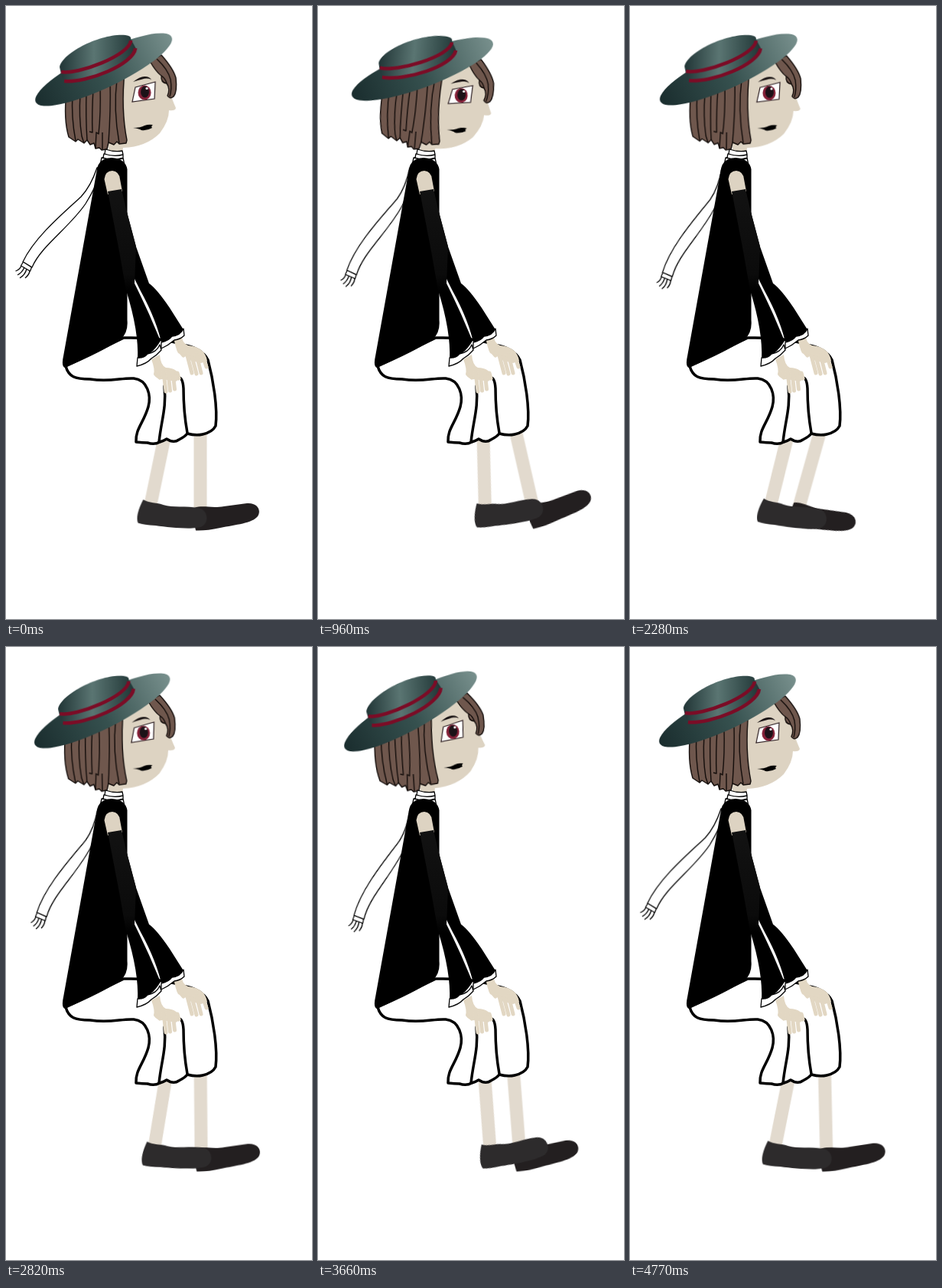
These frames come from a looping animation (400x800 px, 4.8 s). An HTML page:

```html
<!DOCTYPE html>
<html lang="en">
<head>
<meta charset="utf-8">
<title>Swinging legs</title>
<style>
  html, body { margin: 0; width: 100%; height: 100%; overflow: hidden; background: #fff; }
  svg { display: block; width: 400px; height: 800px; }
  .part { transform-box: view-box; animation: 4800ms linear infinite; }
  #head { transform-origin: 140px 188px; animation-name: nod; }
  #tail { transform-origin: 125px 205px; animation-name: flutter; }
  #near { transform-origin: 215px 525px; animation-name: near; }
  #far  { transform-origin: 255px 536px; animation-name: far; }

  @keyframes nod {
    0%, 100% { transform: rotate(.08deg); }
    19.6% { transform: rotate(4.9deg); }
    81.4% { transform: rotate(-4.4deg); }
  }
  @keyframes flutter {
    0%, 100% { transform: rotate(0deg); }
    13.1% { transform: rotate(-9deg); }
    25% { transform: rotate(-5deg); }
    36.2% { transform: rotate(-13deg); }
    54.2% { transform: rotate(-6deg); }
    68.8% { transform: rotate(-11.5deg); }
    76.3% { transform: rotate(-10.4deg); }
    87.5% { transform: rotate(-7deg); }
  }
  @keyframes near {
    0%, 100% { transform: rotate(-.2deg); }
    20.8% { transform: rotate(-13.9deg); }
    50.6% { transform: rotate(3.8deg); }
    77.6% { transform: rotate(-17.3deg); }
  }
  @keyframes far {
    0% { transform: rotate(0deg); }
    17.4% { transform: rotate(-16.2deg); }
    45.2% { transform: rotate(19deg); }
    67.6% { transform: rotate(-13.2deg); }
    76.7% { transform: rotate(-4deg); }
    100% { transform: rotate(-1.2deg); }
  }

  .leg { stroke: #e2dace; stroke-width: 17; }
  .skin { fill: #ddd3c2; }
  .hand { fill: #e2d7c3; }
  .finger { stroke: #e2d7c3; stroke-width: 5; stroke-linecap: round; fill: none; }
  .hair { fill: #6f574d; stroke: #120c0a; stroke-width: 1.4; stroke-linejoin: round; }
  .cloth { fill: #fff; stroke: #000; stroke-width: 1.3; stroke-linejoin: round; }
  .skirt { fill: #fff; stroke: #000; stroke-width: 3.5; stroke-linejoin: round; stroke-linecap: round; }
  .line { fill: none; }
  .ribbon { fill: none; stroke: #7b0c26; stroke-width: 4.6; }
</style>
</head>
<body>
<svg viewBox="0 0 400 800">
  <defs>
    <linearGradient id="brim">
      <stop offset="0" stop-color="#1a2d2e"/>
      <stop offset=".5" stop-color="#36514f"/>
      <stop offset="1" stop-color="#78908d"/>
    </linearGradient>
    <linearGradient id="crown">
      <stop offset="0" stop-color="#213536"/>
      <stop offset=".45" stop-color="#5a7572"/>
      <stop offset="1" stop-color="#1f3535"/>
    </linearGradient>
    <linearGradient id="sleeve" x2="0" y2="1">
      <stop offset="0" stop-color="#121212"/>
      <stop offset=".5" stop-color="#0b0b0b"/>
      <stop offset=".6" stop-color="#000"/>
    </linearGradient>
  </defs>

  <g id="far" class="part">
    <path class="leg" d="M254 540V658"/>
    <path fill="#231f20" d="M246 655C258 651 268 656 285 653L315 649C329 648 334 658 329 666C322 675 300 677 280 681Q262 685 248 684.500Q244 670 246 655Z"/>
  </g>
  <g id="near" class="part">
    <path class="leg" d="M214 530L188 653"/>
    <path fill="#2d2b2c" d="M179 644C186 649 198 648 205 651C218 655 235 652 250 655C264 657 265 674 256 679C248 684 215 681 195 678Q180 677 172 674.500C169 668 173 655 179 644Z"/>
  </g>

  <g id="tail" class="part">
    <path class="cloth" d="M119 211Q111 235 98 249C75 270 37 302 22 334L34 341C46 313 83 289 104 258Q118 236 126 211Z"/>
    <path class="cloth" d="M22.500 334L33.500 341L31.500 346L19.500 339Z"/>
    <path class="cloth line" d="M20 339Q18 344 12.500 346M24 341Q21 348 15 351M27 343Q25 351 18 355M31 346Q30 351 25 355"/>
  </g>

  <g id="head" class="part">
    <path class="skin" d="M130 95L195 65Q208 82 212 106Q217 122 222 133Q221 137 213 136Q213 150 201 166Q183 184 153 185L152 192H134Z"/>
    <path d="M166 99Q176 91 182 92Q187 92 190 96Q184 93.500 178 95.500Q171 97 166 99Z" fill="#171112"/>
    <path d="M169 106L195 99L194 121L165 125Z" fill="#fff" stroke="#2a1c20" stroke-width="1.2"/>
    <ellipse cx="181" cy="113" rx="8.500" ry="9.500" fill="#842138"/>
    <ellipse cx="181.500" cy="112" rx="5.500" ry="7.500" fill="#1c1218"/>
    <circle cx="184" cy="107.500" r="1.600" fill="#fff"/>
    <path d="M166 159Q176 159 181 156Q186 154 192 155Q189 157 191 159Q184 163 177 162Q174 160 166 159Z"/>
    <path class="hair" d="M79 112Q75 148 82 171L91 177L94 174L102 179L106 175L110 181L115 179L117 186L122 185L125 188L132 187L134 178L141 181L145 177L148 180L157 179L158 175Q150 135 155 85L100 85Z"/>
    <path class="hair line" d="M87 115Q85 145 91 176M97 115Q95 145 99 170L102 179M105 112Q104 145 106 175M114 108Q112 140 113 165L109 164M123 105Q124 140 121 167L118 165L117 186M126 165V187M136 98Q137 135 134 178M145 95Q140 135 148 179"/>
    <path class="hair" d="M188 72L203 64Q219 82 222 94Q224 112 219 118Q214 122 211 117Q215 108 210 101Q202 100 203 91Q196 86 188 72Z"/>
    <path class="hair line" d="M197 69Q212 83 215 96Q217 108 214 118M203 91Q208 94 210 101"/>
    <g transform="translate(127.500 83) rotate(-25.600)">
      <ellipse rx="98.500" ry="23.500" fill="url(#brim)"/>
    </g>
    <path fill="url(#crown)" d="M70 80C73 61 125 35 156 38Q164 39 163 43L170 56C165 76 105 101 77 99Q73 96 70 80Z"/>
    <path class="ribbon" d="M72 86C94 90 162 64 163 45M76 98C105 101 167 76 169 55"/>
  </g>

  <path class="cloth" d="M130 187Q142 191 152 189L153 194Q140 197 129 193ZM128 193Q142 197 153 194L153 199Q139 202 127 198ZM125 198Q140 202 153 198L155 208H123Z"/>

  <path class="skirt" d="M78 470C82 484 90 487 110 487C137 491 150 485 167 486C185 488 190 508 186 523C180 544 169 552 170 569Q179 570 185 570Q194 573 201 569Q207 567 210 565Q219 571 226 566Q234 562 237 558Q248 561 257 559Q270 556 274 548C277 525 271 488 264 462Q256 446 230 442Q205 432 154 433Z"/>
  <path class="skirt line" d="M207 496C210 525 203 540 200 569M224 485Q231 483 232 499Q232 530 237 557"/>

  <path d="M119 213Q121 199 138 198Q156 199 158.500 213V410Q160 426 150 435Q126 451 77 472Q72 470 75 457Z"/>

  <g id="arms">
    <path class="hand" d="M219 431L229 428Q230 440 238 443Q260 445 263 463L255 466L239 462Q235 456 225 453Q221 445 219 431Z"/>
    <path class="finger" d="M237 456L243 479M243 457L249 480M249 455L255 479M256 453L262 471M226 449L232 456"/>
    <path d="M150 245L157 265L170 314L187 362Q197 369 214 394L233 424L204 443Q197 410 176 372L160 340Z"/>
    <path class="cloth" stroke-width="2" d="M203 439Q213 437 217 431Q228 430 232 421L233 430Q228 435 220 436Q212 443 203 447Z"/>
    <path class="hand" d="M190 461L201 455Q202 469 209 472Q225 472 228 486L222 490L205 487Q198 488 193 481Q195 474 190 461Z"/>
    <path class="finger" d="M206 478L209 503M212 479L214.500 502M218 478L220.500 500M224 479L226 486M196 480L201 485"/>
    <path class="skin" d="M128.500 226Q130 215 139 215Q148 216 149 226L152 242L133 246Z"/>
    <path fill="url(#sleeve)" d="M133 242L151 239L157 265L170 314L168 362Q175 376 187 402L202 437Q190 457 172 462Q174 425 157 371L148 320Z"/>
    <path class="cloth" stroke-width="2" d="M172 459Q180 460 185 454Q197 452 201 442L203 449Q197 456 190 460Q184 467 171 470Z"/>
  </g>
</svg>
</body>
</html>
```
